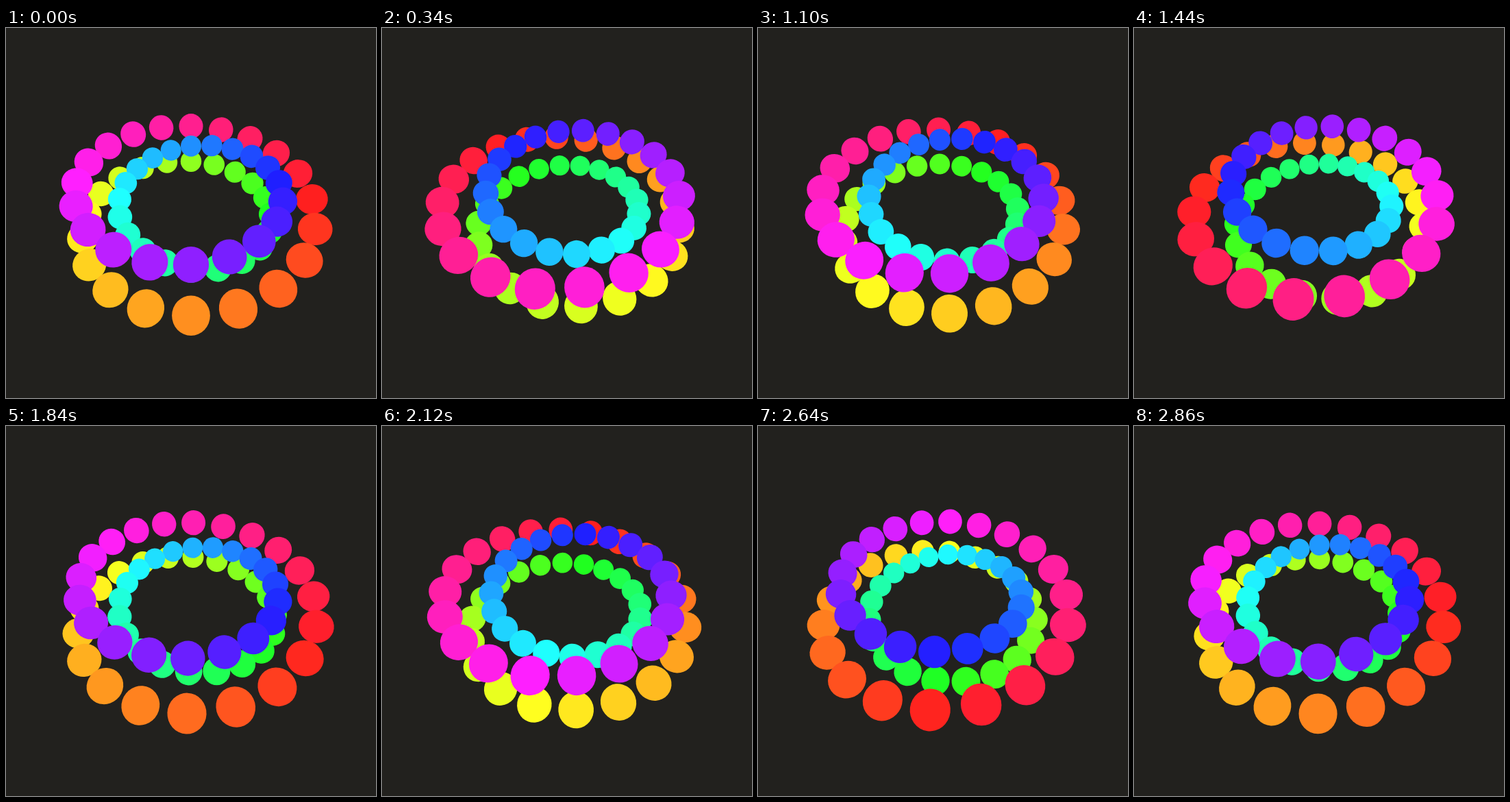
An HTML page with a canvas that plays this animation: 540x540 px, repeating every 2880 ms.

```html
<!DOCTYPE html>
<html lang="en">
<head>
<meta charset="utf-8">
<title>Rainbow coil</title>
<style>
  html, body { margin: 0; width: 100%; height: 100%; overflow: hidden; background: #22211e; }
  canvas { display: block; }
</style>
</head>
<body>
<canvas id="stage" width="540" height="540"></canvas>
<script>
const ctx = document.getElementById('stage').getContext('2d');
const SIZE = 540, PERIOD = 960, FRAME = 20;
const BALLS = 60, STEP = 18;          // three turns of twenty balls
const RING = 140, TUBE = 36;          // radii of the coil
const CAM = 467.65, LIFT = -20;       // focal length and distance, vertical shift
const TILT = 0.8;
const SIN_TILT = Math.sin(TILT), COS_TILT = Math.cos(TILT);
const rad = deg => deg * Math.PI / 180;

// Camera-space position, radius and hue of one ball.
function ball(i, turn) {
  const around = STEP * (i - turn);
  const hue = 30 + (around + 360 * turn) / 3;
  const a = rad(around), t = rad(hue);
  const rho = RING + TUBE * Math.cos(t);
  const up = -TUBE * Math.sin(t);
  const near = rho * Math.cos(a);
  return {
    x: -rho * Math.sin(a),
    y: near * SIN_TILT - up * COS_TILT + LIFT,
    z: CAM - near * COS_TILT - up * SIN_TILT,
    r: 19.25 + 2.6 * Math.cos(t),
    hue
  };
}

// A sphere in perspective is an ellipse stretched away from the centre.
function drawBall({ x, y, z, r, hue }) {
  const off = Math.hypot(x, y);
  const tilt = Math.atan2(off, z);
  const spread = Math.asin(r / Math.hypot(off, z));
  const inner = CAM * Math.tan(tilt - spread);
  const outer = CAM * Math.tan(tilt + spread);
  const dir = Math.atan2(y, x), mid = (inner + outer) / 2;
  ctx.fillStyle = `hsl(${hue % 360}, 100%, 56%)`;
  ctx.beginPath();
  ctx.ellipse(SIZE / 2 + mid * Math.cos(dir), SIZE / 2 + mid * Math.sin(dir),
    (outer - inner) / 2, CAM * r / Math.sqrt(z * z - r * r), dir, 0, 2 * Math.PI);
  ctx.fill();
}

function draw(ms) {
  const turn = Math.floor(ms / FRAME) * FRAME % PERIOD / PERIOD;
  ctx.fillStyle = '#22211e';
  ctx.fillRect(0, 0, SIZE, SIZE);
  Array.from({ length: BALLS }, (_, i) => ball(i, turn))
    .sort((p, q) => q.z - p.z)
    .forEach(drawBall);
}

const start = performance.now();
function tick() {
  draw(performance.now() - start);
  requestAnimationFrame(tick);
}
tick();
</script>
</body>
</html>
```
